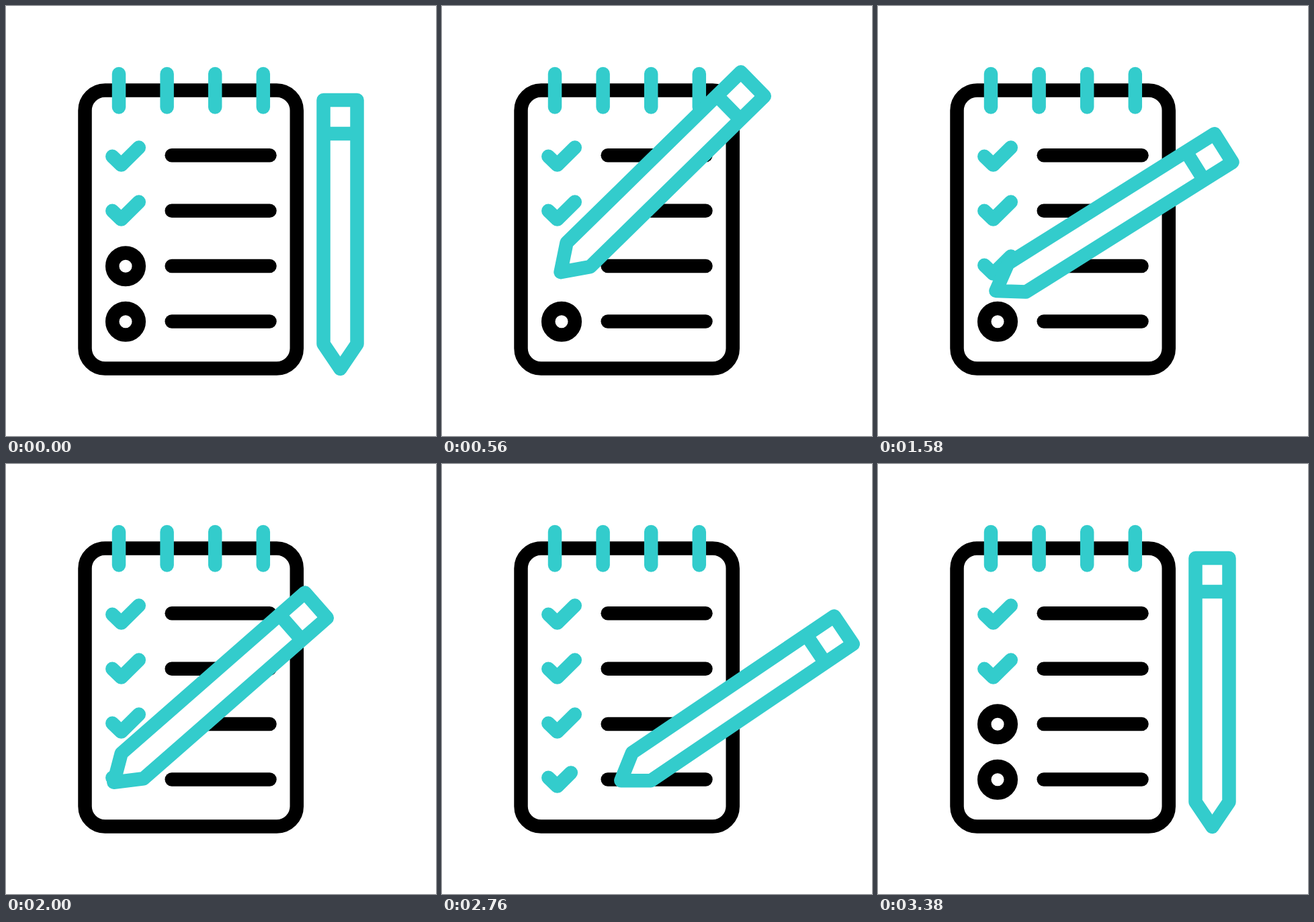
Write an HTML page that moves like this. It is 640 by 640 pixels and loops after 3.6 s.

```html
<!DOCTYPE html>
<html lang="en">
<head>
<meta charset="utf-8">
<title>Checklist</title>
<style>
  html, body { margin: 0; width: 100%; height: 100%; overflow: hidden; background: #fff; }
  svg { display: block; width: 100vw; height: 100vh; }
  path, rect, circle { fill: none; stroke: #000; stroke-width: 20.5; stroke-linecap: round; stroke-linejoin: round; }
  .teal { stroke: #33cccc; }
</style>
</head>
<body>
<svg viewBox="0 0 640 640">
  <rect x="117.5" y="125.5" width="315.3" height="414" rx="30"/>
</svg>
<script>
const LOOP = 3600;
const REST = { t: 3320, x: 497.5, y: 540 };
const WRITE_TILT = 48.8, LIFT_TILT = 58;

const svg = document.querySelector('svg');

function add(tag, attrs) {
  const el = document.createElementNS(svg.namespaceURI, tag);
  for (const name in attrs) el.setAttribute(name, attrs[name]);
  return svg.appendChild(el);
}

// Four identical rows; the last two are ticked off during the loop
const rings = [], ticks = [];
for (let i = 0; i < 4; i++) {
  const lineY = 222.3 + 82.4 * i;
  add('path', { d: `M${168 + 71.6 * i} 101v49.5`, class: 'teal' });
  add('path', { d: `M246.7 ${lineY}H392.5` });
  if (i > 1) rings.push(add('circle', { cx: 178, cy: lineY + 0.2, r: 19.8 }));
  const tick = add('path', { d: `M158.3 ${223.8 + 81 * i}l13.2 12.8 26.3-26`, class: 'teal', pathLength: 1 });
  if (i > 1) ticks.push(tick);
}
const pencil = add('path', { d: 'M0 0L-25-37V-400H25V-37ZM-25-350H25', class: 'teal', style: 'fill:#fff' });

// When the pencil begins a tick and reaches its corner, and when the tick is complete
const strokes = [
  { start: 665, corner: 1080, done: 1560 },
  { start: 1790, corner: 2260, done: 3015 }
];

const tipKeys = [
  { ...REST, t: 0 },
  ...strokes.flatMap(({ start, corner }, i) => [
    { t: start, x: 154, y: 386 + 81 * i },
    { t: corner, x: 169, y: 402 + 81 * i },
    { t: corner + 260, x: 202, y: 371 + 81 * i }
  ]),
  REST
];
const tiltKeys = [
  { t: 0, angle: 0 },
  ...strokes.flatMap(({ start, corner }) => [
    { t: start, angle: WRITE_TILT },
    { t: corner, angle: WRITE_TILT },
    { t: start + 900, angle: LIFT_TILT }
  ]),
  { t: REST.t, angle: 0 }
];

function ease(t, from, to) {
  const u = Math.min(1, Math.max(0, (t - from) / (to - from)));
  return u * u * (3 - 2 * u);
}

function sample(keys, prop, t) {
  const next = keys.findIndex(key => key.t > t);
  if (next < 0) return keys[keys.length - 1][prop];
  const a = keys[next - 1], b = keys[next];
  return a[prop] + (b[prop] - a[prop]) * ease(t, a.t, b.t);
}

function draw(t) {
  const x = sample(tipKeys, 'x', t), y = sample(tipKeys, 'y', t);
  pencil.setAttribute('transform', `translate(${x} ${y}) rotate(${sample(tiltKeys, 'angle', t)})`);

  const reset = ease(t, 3200, 3300);
  strokes.forEach(({ start, done }, i) => {
    const drawn = ease(t, start + 190, done);
    rings[i].style.opacity = t < start - 170 ? 1 : reset;
    ticks[i].style.opacity = drawn > 0 ? 1 - reset : 0;
    ticks[i].style.strokeDasharray = drawn < 1 ? `${drawn} 2` : 'none';
  });
}

function play() {
  draw(performance.now() % LOOP);
  requestAnimationFrame(play);
}
play();
</script>
</body>
</html>
```
